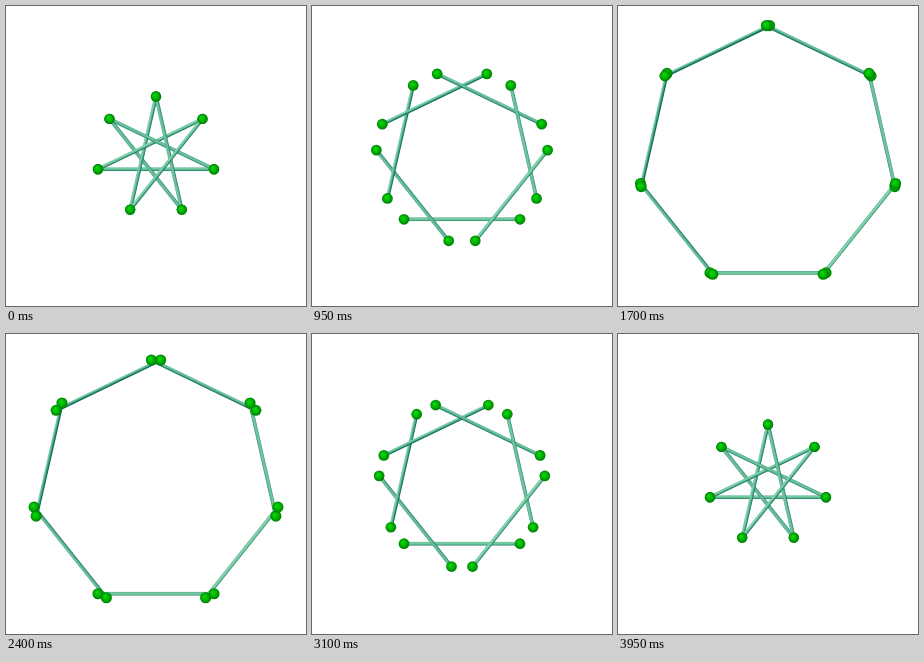
An HTML page with a canvas that plays this animation: 300x300 px, repeating every 4000 ms.

```html
<!DOCTYPE html>
<html>
<head>
<meta charset="utf-8">
<style>
html, body { margin: 0; width: 100%; height: 100%; overflow: hidden; background: #fff; }
canvas { display: block; width: 300px; height: 300px; }
</style>
</head>
<body>
<canvas id="stage" width="300" height="300"></canvas>
<script>
const ctx = document.getElementById('stage').getContext('2d');
const SIDES = 7, HALF = 58, BAR = 1.8, LOOP = 4000, STEP = 50;
// Distance of each bar from the centre: star {7/3} and plain heptagon
const NEAR = HALF / Math.tan(3 * Math.PI / SIDES);
const FAR = HALF / Math.tan(Math.PI / SIDES);
const DARK = [10, 105, 90], LIGHT = [130, 215, 170];

const clamp = v => Math.max(0, Math.min(1, v));

function distanceAt(ms) {
  const fromPeak = Math.abs(ms - LOOP / 2);
  return NEAR + (FAR - NEAR) * clamp((1750 - fromPeak) / 1500);
}

// Shade a cylinder lit from the upper left; outer bars show their inner side
function barFill(d, angle) {
  const facing = (Math.sin(angle) - Math.cos(angle)) * Math.SQRT1_2;
  const fill = ctx.createLinearGradient(0, d - BAR, 0, d + BAR);
  for (let i = 0; i <= 6; i++) {
    const a = Math.asin((i / 3 - 1) * 0.95) - 0.45 * d / FAR;
    const lit = clamp(0.6 * facing * Math.sin(a) + 0.8 * Math.cos(a));
    const rgb = DARK.map((c, j) => Math.round(c + (LIGHT[j] - c) * lit));
    fill.addColorStop(i / 6, `rgb(${rgb})`);
  }
  return fill;
}

function ball(x, y, r) {
  const fill = ctx.createRadialGradient(x - 1.4, y - 1.5, 0, x, y, r);
  fill.addColorStop(0, '#14d614');
  fill.addColorStop(0.55, '#00b800');
  fill.addColorStop(1, '#007a08');
  ctx.fillStyle = fill;
  ctx.beginPath();
  ctx.arc(x, y, r, 0, 2 * Math.PI);
  ctx.fill();
}

function draw(ms) {
  const d = distanceAt(ms);
  const angles = Array.from({ length: SIDES }, (_, k) => k * 2 * Math.PI / SIDES);
  ctx.setTransform(1, 0, 0, 1, 150, 150);
  ctx.fillStyle = '#fff';
  ctx.fillRect(-150, -150, 300, 300);
  for (const a of angles) {
    ctx.save();
    ctx.rotate(a);
    ctx.fillStyle = barFill(d, a);
    ctx.fillRect(-HALF, d - BAR, 2 * HALF, 2 * BAR);
    ctx.restore();
  }
  for (const a of angles) {
    const c = Math.cos(a), s = Math.sin(a);
    for (const x of [-HALF, HALF]) ball(x * c - d * s, x * s + d * c, 5.1 + 0.5 * d / FAR);
  }
}

const start = performance.now();
function tick() {
  const ms = (performance.now() - start) % LOOP;
  draw(Math.floor(ms / STEP) * STEP);
  requestAnimationFrame(tick);
}
tick();
</script>
</body>
</html>
```
